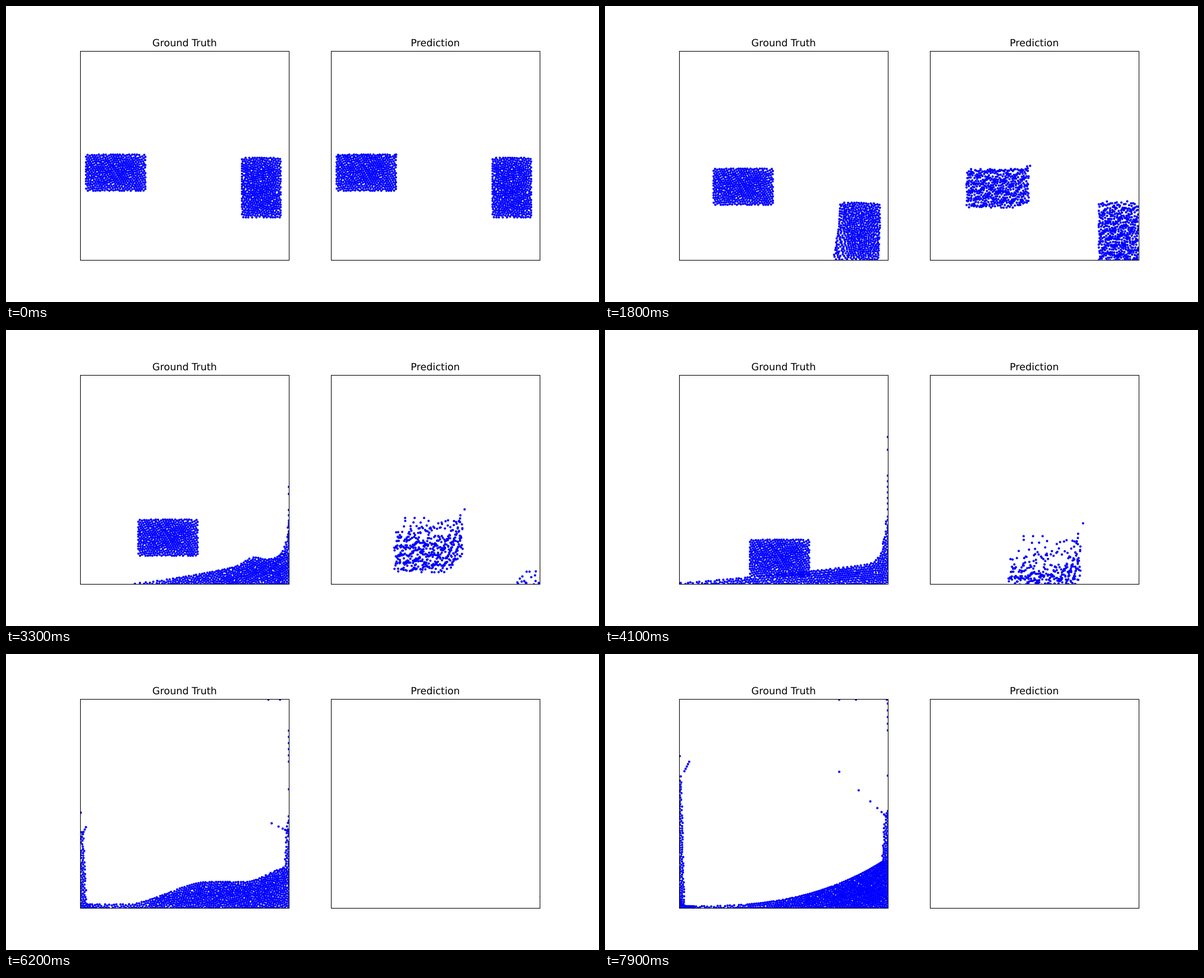
Recreate the animation shown at these times as an HTML page with a canvas. Size 1000 px wide and 500 px high, loop 8000 ms.

```html
<!DOCTYPE html>
<html lang="en">
<head>
<meta charset="utf-8">
<title>Fluid comparison</title>
<style>
  html, body { margin: 0; width: 100%; height: 100%; overflow: hidden; background: #fff; }
  canvas, svg { position: absolute; left: 0; top: 0; }
  text { font: 16.67px "DejaVu Sans", sans-serif; text-anchor: middle; text-rendering: geometricPrecision; }
  rect { fill: none; stroke: #000; }
</style>
</head>
<body>
<canvas id="stage" width="1000" height="500"></canvas>
<svg width="1000" height="500">
  <rect x="125.5" y="76.5" width="352" height="353"/>
  <rect x="548.5" y="76.5" width="352" height="353"/>
  <text x="301.2" y="68">Ground Truth</text>
  <text x="723.9" y="68">Prediction</text>
</svg>
<script>
const ctx = document.getElementById('stage').getContext('2d');
const LEFT = 126, RIGHT = 477, TOP = 77, FLOOR = 429;
const SPACING = 4, PANEL_SHIFT = 422.5;

let seed = 7;
function random() {
  seed = (seed + 0x6D2B79F5) | 0;
  let h = Math.imul(seed ^ (seed >>> 15), 1 | seed);
  h = (h + Math.imul(h ^ (h >>> 7), 61 | h)) ^ h;
  return ((h ^ (h >>> 14)) >>> 0) / 4294967296;
}
const repeat = (n, make) => Array.from({ length: n }, (_, i) => make(i));
const lerp = (a, b, k) => a + (b - a) * k;
const clamp = (v, lo, hi) => Math.min(hi, Math.max(lo, v));

// Building blocks for the water surface
const rise = (x, from, to) => {
  const k = clamp((x - from) / (to - from), 0, 1);
  return k * k * (3 - 2 * k);
};
const slope = (x, from, to, power) => Math.max(0, (x - from) / (to - from)) ** power;
const hump = (x, centre, width) => Math.exp(-(((x - centre) / width) ** 2));
const climb = (distance, width) => Math.exp(-distance / width);

// Evenly spread points below a surface: low-discrepancy start, then mutual repulsion
function scatter(count, left, right, height, floor = FLOOR) {
  const highest = Math.max(...repeat(400, i => height(lerp(left, right, i / 399))));
  const points = [];
  for (let i = 1; points.length < count; i++) {
    const x = lerp(left, right, i * 0.7548777 % 1), h = highest * (i * 0.5698403 % 1);
    if (h <= height(x)) points.push({ x: x + random() * 2 - 1, y: floor - h + random() * 2 - 1 });
  }
  for (let pass = 0; pass < 40; pass++) {
    points.sort((a, b) => a.x - b.x);
    points.forEach((a, i) => {
      for (let j = i + 1; j < count && points[j].x - a.x < SPACING; j++) {
        const b = points[j], dx = b.x - a.x, dy = b.y - a.y;
        const dist = Math.hypot(dx, dy) || 0.01;
        if (dist >= SPACING) continue;
        const push = 0.2 * (SPACING - dist) / dist;
        a.x -= dx * push; a.y -= dy * push;
        b.x += dx * push; b.y += dy * push;
      }
    });
    for (const p of points) {
      p.x = clamp(p.x, left, right);
      p.y = clamp(p.y, floor - height(p.x), floor);
    }
  }
  return points;
}

function makeBlock(count, x, y, width, height, fall, contact) {
  return scatter(count, x, x + width, () => height, y + height).map(p => {
    const d = fall(contact);
    return {
      ...p, fall, u: (p.x - x) / width, v: (p.y - y) / height, r: random(),
      path: [{ t: contact, x: p.x + d.x, y: p.y + d.y }]
    };
  });
}

// Sends particles below a new surface, column by column and layer by layer
function flowTo(t, particles, left, height, skew = 0) {
  const last = p => p.path[p.path.length - 1];
  const order = p => last(p).x - skew * last(p).y;
  const from = [...particles].sort((a, b) => order(a) - order(b));
  const to = scatter(from.length, left, RIGHT, height).sort((a, b) => a.x - b.x);
  for (let i = 0; i < from.length; i += 24) {
    const column = from.slice(i, i + 24).sort((a, b) => last(a).y - last(b).y);
    const places = to.slice(i, i + 24).sort((a, b) => a.y - b.y);
    column.forEach((p, k) => p.path.push({ t, ...places[k] }));
  }
}

function along(path, t) {
  let i = 1;
  while (i < path.length - 1 && t > path[i].t) i++;
  const a = path[i - 1], b = path[i], k = (t - a.t) / (b.t - a.t);
  return { x: lerp(a.x, b.x, k), y: lerp(a.y, b.y, k) };
}

const leftBlock = makeBlock(480, 135, 251, 100, 61,
  t => ({ x: 26.7 * t, y: 3.72 * t + 5.23 * t * t }), 4.1);
const rightBlock = makeBlock(525, 398, 256.5, 65, 100.5,
  t => ({ x: -0.8 * t, y: 32.9 * t + 5.23 * t * t }), 1.7);
const water = [...leftBlock, ...rightBlock];

// The right block collapses, then both share one sloshing surface
flowTo(2.5, rightBlock, 305, x => 2 + 11 * rise(x, 305, 375) + 50 * rise(x, 372, 402)
  - 10 * rise(x, 440, 474) + 14 * climb(RIGHT - x, 2), 0.3);
flowTo(3.3, rightBlock, 215, x => 1 + 26 * slope(x, 215, 380, 1.3) + 10 * hump(x, 415, 18)
  + 75 * climb(RIGHT - x, 5));
flowTo(4.1, rightBlock, LEFT, x => 2 + 32 * slope(x, LEFT, 456, 1.2) + 105 * climb(RIGHT - x, 7));
flowTo(4.9, water, LEFT, x => 7 + 17 * rise(x, LEFT, 420) + 38 * hump(x, 318, 62)
  + 115 * climb(RIGHT - x, 8) + 45 * climb(x - LEFT, 3));
flowTo(6.2, water, LEFT, x => 6 + 38 * rise(x, 200, 345) + 22 * rise(x, 405, 470)
  + 95 * rise(x, 467, RIGHT) + 122 * (1 - rise(x, 130, 137)));
flowTo(7.9, water, LEFT, x => 3 + 72 * slope(x, 140, 463, 2.7)
  + 80 * rise(x, 466, 473) + 222 * (1 - rise(x, 128, 135)));

// Drops thrown up the right wall, as start height and speed
const climbers = [[265, 110], [277, 98], [345, 57], ...repeat(6, n => [304 + 9 * n, 77 - n / 2])];

// A jet curling off the right wall, its drops bunching towards the wall
const jet = repeat(8, n => 0.6 ** n).map(k => [
  { t: 4.1, x: 425, y: 412 },
  { t: 4.9, x: 407 + 20 * k, y: 377 - 14 * k },
  { t: 6.2, x: RIGHT - 29 * k, y: 300 - 14 * k },
  { t: 7.9, x: RIGHT - 82 * k, y: 277 - 78 * k }
]);

// Predicted drops that lag behind the top of the left block
const stragglers = [
  ...repeat(3, n => ({ x: 560.5 + 16 * n, y: 252, lag: 1 })),
  ...repeat(15, n => ({ x: 560 + 6.6 * n + 4 * random(), y: 252 + 5 * random(), lag: 0.5 + 0.5 * random() }))
];

function dot(x, y) {
  ctx.moveTo(x + 2, y);
  ctx.arc(x, y, 2, 0, 2 * Math.PI);
}

function drawPanel(x, drawDots) {
  ctx.save();
  ctx.beginPath();
  ctx.rect(x, 76.5, 352, 353);
  ctx.clip();
  ctx.beginPath();
  drawDots();
  ctx.fill();
  ctx.restore();
}

function drawSpray(t) {
  if (t >= 2.4) {
    const s = t - 3.3;
    for (const [start, speed] of climbers) {
      // Drops that reach the ceiling slide back along it
      const y = start - speed * s + 5.8 * s * s;
      dot(RIGHT - 0.42 * Math.max(0, TOP - y), clamp(y, TOP, FLOOR));
    }
  }
  if (t < 4.1) return;
  const q = t - 4.1;
  dot(LEFT, FLOOR - 88 * q + 5.4 * q * q);
  for (let n = 0; n < 5; n++) {
    dot(Math.max(LEFT, LEFT + 4.2 * q - 2 * n), Math.min(FLOOR, FLOOR - 65 * q + 4 * n));
  }
  for (const path of jet) {
    const p = along(path, t);
    dot(p.x, p.y);
  }
}

function drawTruth(t) {
  for (const p of water) {
    if (t > p.path[0].t) {
      const q = along(p.path, t);
      dot(q.x, q.y);
    } else {
      const d = p.fall(t);
      dot(p.x + d.x, p.y + d.y);
    }
  }
  drawSpray(t);
}

function drawPrediction(t) {
  const t2 = t * t, clump = Math.min(3.2, 0.4 * t2);
  const slow = 5 * t + 4.5 * t2, fast = -0.7 * t + 8.9 * t2;
  // Particles gather into ragged bands as the error grows
  const place = (p, dx, dy) => {
    const band = p.y * 0.42 + 2 * Math.sin(p.x / 11 + p.y / 25) + 1.3 * Math.sin(p.x / 4.3);
    dot(p.x + PANEL_SHIFT + dx + 0.7 * clump * Math.sin(p.x / 2.4 + p.y / 5),
        p.y + dy - clump * Math.sin(band) + 0.7 * clump * (p.r - 0.5));
  };
  for (const p of leftBlock) {
    const lift = 2.6 * t2 * slope(p.u, 0.7, 1, 2);
    const s = Math.min(1, 0.45 + 0.5 * p.r + 2 * p.v);
    place(p, 28.5 * t + (0.5 + p.u) * t2, lerp(slow, fast, s) - lift);
  }
  for (const p of rightBlock) {
    const s = Math.min(1, 3 * p.v + p.r);
    place(p, 4 * t2, lerp(37 * t + 2.4 * t2, 30 * t + 7.7 * t2, s));
  }
  for (const p of stragglers) {
    dot(p.x + 28.5 * t + 1.7 * t2, p.y + lerp(fast, slow, p.lag));
  }
  dot(658 + 30 * t + 1.5 * t2, 251 + 4.5 * t + 3.4 * t2);
}

function draw(now) {
  const t = Math.floor(now % 8000 / 100) / 10;
  ctx.clearRect(0, 0, 1000, 500);
  ctx.fillStyle = '#00f';
  drawPanel(125.5, () => drawTruth(t));
  drawPanel(548.5, () => drawPrediction(t));
  requestAnimationFrame(draw);
}
requestAnimationFrame(draw);
</script>
</body>
</html>
```
